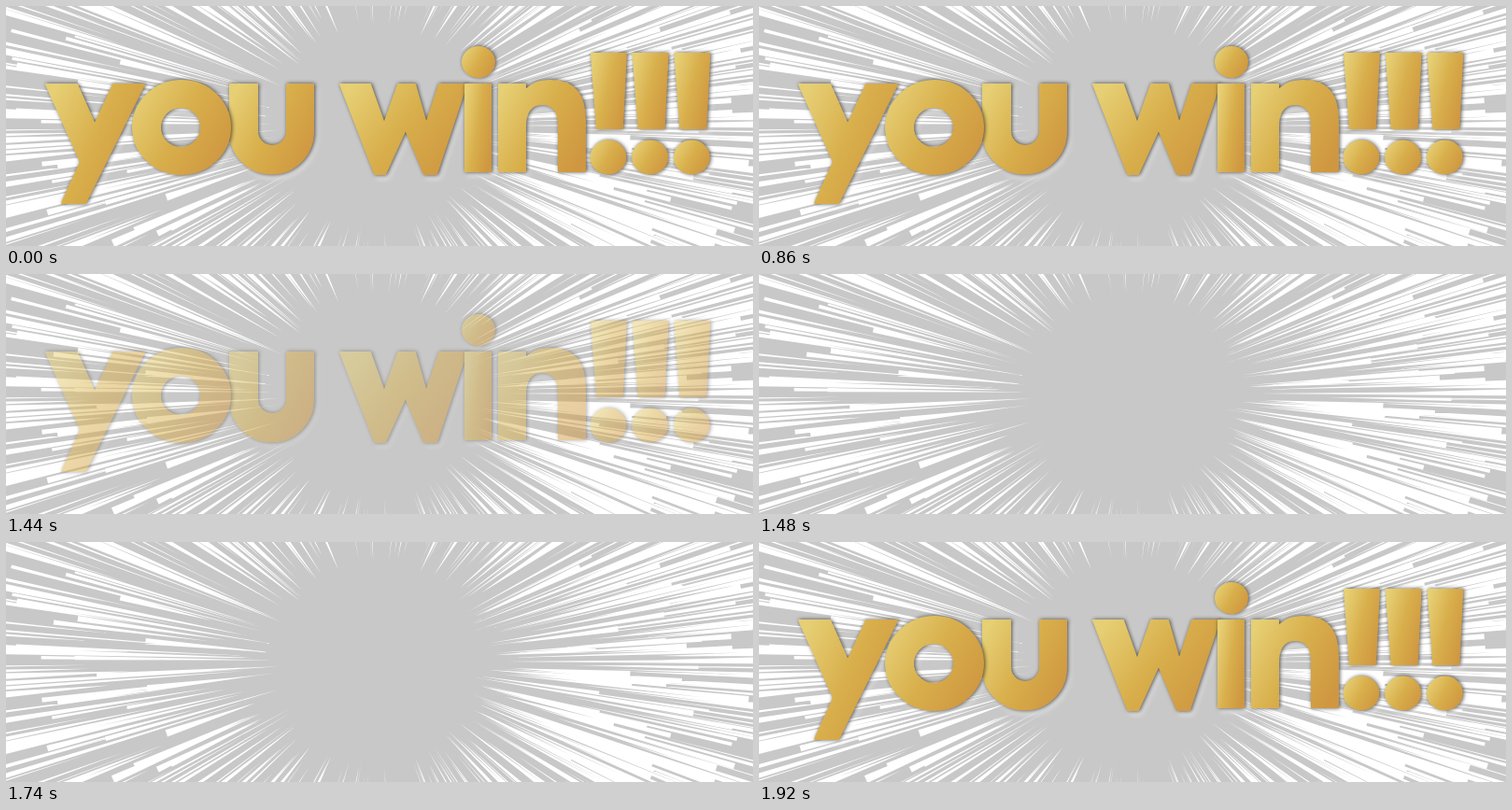
Animation, 800 px wide and 257 px high, one loop 1960 ms. Source, as an HTML page:

```html
<!DOCTYPE html>
<html lang="en">
<head>
<meta charset="utf-8">
<title>you win!!!</title>
<style>
  html, body { margin: 0; height: 100%; overflow: hidden; background: #c8c8c8; }
  svg { display: block; width: 100vw; height: 100vh; }
  #words { filter: drop-shadow(3px 5px 2px #fff5); }
  #words > * {
    fill: url(#gold); stroke: url(#gold); stroke-width: 2; stroke-linejoin: round;
    filter: drop-shadow(1.5px 0 2px #000a);
  }
</style>
</head>
<body>
<svg viewBox="0 0 800 257" role="img" aria-label="you win!!!">
  <defs>
    <linearGradient id="gold" x1="0" y1=".2" x2="1" y2=".75">
      <stop offset="0" stop-color="#e6cf74"/>
      <stop offset=".5" stop-color="#d8ae4b"/>
      <stop offset="1" stop-color="#cf9741"/>
    </linearGradient>
  </defs>
  <path id="rays" fill="#fff"/>
  <g id="words">
    <path d="M43 84H76L95 127L115 84H148L85 211H60L80 167Z"/>
    <path d="M240 84H269V134A16 16 0 0 0 301 134V84H329V135A44 44 0 0 1 240 135Z"/>
    <path fill-rule="evenodd" d="M136 130a52 50 0 1 0 104 0a52 50 0 1 0 -104 0ZM165 130a22 22 0 1 0 44 0a22 22 0 1 0 -44 0Z"/>
    <path d="M358 84H390L405 126L420 84H438L450 126L464 84H493L461 180H448L428 132L406 180H395Z"/>
    <path d="M528 84H556V91Q565 80 583 80Q620 80 620 122V177H592V128Q592 105 574 105Q556 105 556 130V177H528Z"/>
    <path d="M492 84H519V177H492Z"/>
    <ellipse cx="506" cy="60" rx="17" ry="16"/>
  </g>
</svg>
<script>
const NS = 'http://www.w3.org/2000/svg';
const CX = 398, CY = 128, LOOP = 1960;
const words = document.getElementById('words');

function add(tag, attrs) {
  const node = document.createElementNS(NS, tag);
  for (const key in attrs) node.setAttribute(key, attrs[key]);
  words.append(node);
}
for (let i = 0; i < 3; i++) {
  const x = 645 + i * 44.7;
  add('path', { d: `M${x - 18} 51h37l-4 80h-27Z` });
  add('ellipse', { cx: x, cy: 162, rx: 18.5, ry: 17.5 });
}

let seed = 29;
function random(min, max) {
  seed = (seed * 16807) % 2147483647;
  return min + (max - min) * seed / 2147483647;
}

// A wedge pointing at the centre, blunt at its outer end.
function ray(angle, inner, length, width) {
  const c = Math.cos(angle), s = Math.sin(angle);
  const at = (r, side) =>
    `${(CX + r * c - side * s).toFixed(1)} ${(CY + r * s + side * c).toFixed(1)}`;
  const outer = inner + length;
  return `M${at(inner, 0)}L${at(outer, -width / 2)}L${at(outer, width / 2)}Z`;
}

// Spread rays around the centre, a little denser on the right.
function burst(count, maxInner, minWidth, maxWidth) {
  let d = '';
  for (let i = 0; i < count; i++) {
    const turn = (i + random(0, 1)) / count * Math.PI * 2;
    const angle = turn - 0.25 * Math.sin(turn);
    d += ray(angle, random(105, maxInner), random(100, 350), random(minWidth, maxWidth));
  }
  return d;
}
document.getElementById('rays').setAttribute('d', burst(90, 145, 4, 9) + burst(540, 330, 2, 8));

function frame() {
  const t = performance.now() % LOOP;
  words.style.opacity = t < 1440 || t >= 1920 ? 1 : t < 1480 ? 0.5 : 0;
  requestAnimationFrame(frame);
}
frame();
</script>
</body>
</html>
```
